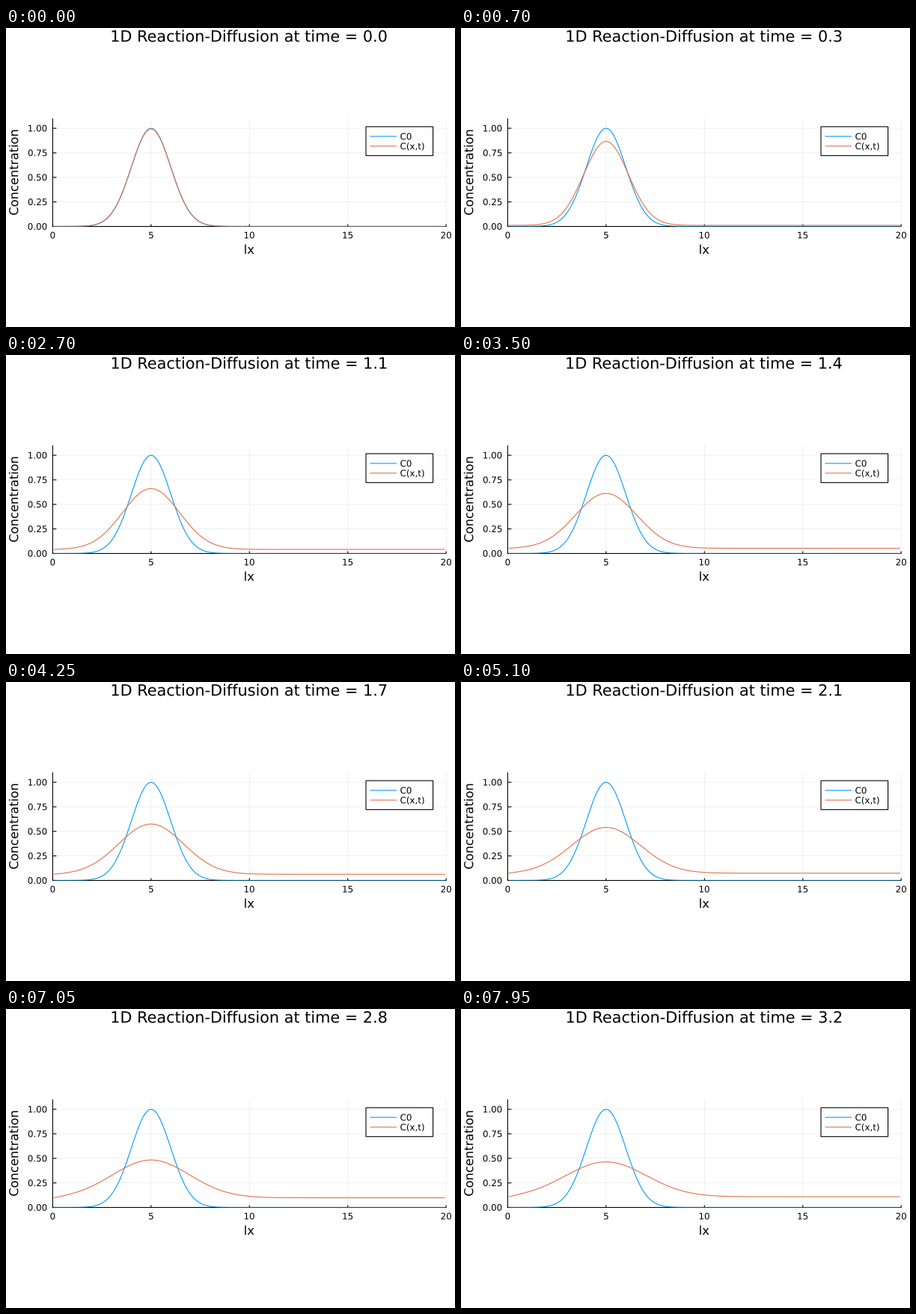
Write a matplotlib script that moves like this. It is 600x400 px and loops after 8000 ms.

```python
import numpy as np
import matplotlib
import matplotlib.pyplot as plt
from matplotlib.animation import FuncAnimation
from matplotlib.patches import PathPatch, Rectangle
from matplotlib.path import Path
from matplotlib.textpath import TextPath
from matplotlib.transforms import Affine2D

matplotlib.rcParams["font.family"] = "DejaVu Sans"

W, H, DPI = 600, 400, 100
FRAMES, INTERVAL = 160, 50
BLUE, RED = "#009AFA", "#E36F47"

# Physics
LX, DIFF, C_EQ, XI = 20.0, 0.5, 0.4, 10.0
NX, STEPS_PER_FRAME = 200, 2
DX = LX / NX
DT = DX**2 / DIFF / 2

# Plot area in pixels
LEFT, RIGHT, TOP, BOTTOM = 62.4, 588.2, 121.0, 265.5
Y_MAX = 1.1
TICK, GUIDE, TITLE = 11.88, 16.34, 20.8


def px(x):
    return LEFT + (RIGHT - LEFT) * x / LX


def py(c):
    return BOTTOM - (BOTTOM - TOP) * c / Y_MAX


def pt(pixels):
    return pixels * 72 / DPI


def solve(c0):
    """Explicit diffusion with linear reaction; one state per frame."""
    c, states = c0.copy(), []
    for it in range(FRAMES * STEPS_PER_FRAME):
        flux = -DIFF * np.diff(c) / DX
        c[1:-1] -= DT * np.diff(flux) / DX
        c -= DT * (c - C_EQ) / XI
        if it % STEPS_PER_FRAME == 0:
            states.append(((it + 1) * DT, c.copy()))
    return states


fig = plt.figure(figsize=(W / DPI, H / DPI), dpi=DPI, facecolor="white")
ax = fig.add_axes([0, 0, 1, 1])
ax.set_xlim(0, W)
ax.set_ylim(H, 0)
ax.axis("off")


def line(xs, ys, color="black", width=1.1, z=2, **kw):
    return ax.plot(xs, ys, color=color, lw=pt(width), zorder=z,
                   solid_capstyle="butt", snap=False, **kw)[0]


def text_path(x, y, s, size, align=0.5, angle=0):
    """Outline of s on baseline y; align 0, 0.5, 1 is left, centre, right."""
    path = TextPath((0, 0), s, size=size)
    box = path.get_extents()
    shift = -(box.x0 + align * box.width)
    place = Affine2D().translate(shift, 0).scale(1, -1)
    return place.rotate_deg(angle).translate(x, y).transform_path(path)


def label(*args, **kw):
    return ax.add_patch(PathPatch(text_path(*args, **kw), fc="black", lw=0,
                                  zorder=6, snap=False))


# Grid, ticks and tick labels
for v in range(0, 21, 5):
    x = px(v)
    line([x, x], [TOP, BOTTOM], width=0.6, z=1, alpha=0.1)
    line([x, x], [BOTTOM, BOTTOM - 3])
    label(x, 281.4, str(v), TICK)
for v in np.arange(0, 1.01, 0.25):
    y = py(v)
    line([LEFT, RIGHT], [y, y], width=0.6, z=1, alpha=0.1)
    line([LEFT, LEFT + 5], [y, y])
    label(54.4, y + 4.3, f"{v:.2f}", TICK, align=1)

line([LEFT, RIGHT], [BOTTOM, BOTTOM])
line([LEFT, LEFT], [TOP, BOTTOM])
label(px(LX / 2), 302, "lx", GUIDE)
label(16.2, (TOP + BOTTOM) / 2, "Concentration", GUIDE, angle=-90)
title_at = (px(LX / 2) - 0.3, 18.3)
title = label(*title_at, "1D", TITLE)

# Curves, cut off at the edges of the plot area
x = np.linspace(DX / 2, LX - DX / 2, NX)
c0 = np.exp(-(x - LX / 4) ** 2 / 2)
states = solve(c0)
base = line(px(x), py(c0), BLUE, z=3)
curve = line(px(x), py(c0), RED, z=4)
area = Path([(LEFT, TOP), (RIGHT, TOP), (RIGHT, BOTTOM), (LEFT, BOTTOM),
             (LEFT, TOP)], closed=True)
for c in (base, curve):
    c.set_clip_path(area, ax.transData)

# Legend
ax.add_patch(Rectangle((481, 132), 89.6, 38.7, fc="white", ec="black",
                       lw=pt(1.1), zorder=5, snap=False))
for y, color, name in ((145, BLUE, "C0"), (158, RED, "C(x,t)")):
    line([486.5, 522], [y, y], color, z=6)
    label(527.2, y + 4.3, name, TICK, align=0)


def update(i):
    t, c = states[i]
    curve.set_ydata(py(c))
    text = f"1D Reaction-Diffusion at time = {t:.1f}"
    title.set_path(text_path(*title_at, text, TITLE))
    return curve, title


anim = FuncAnimation(fig, update, frames=FRAMES, interval=INTERVAL,
                     repeat=True, repeat_delay=0, blit=False)
plt.show()
```
